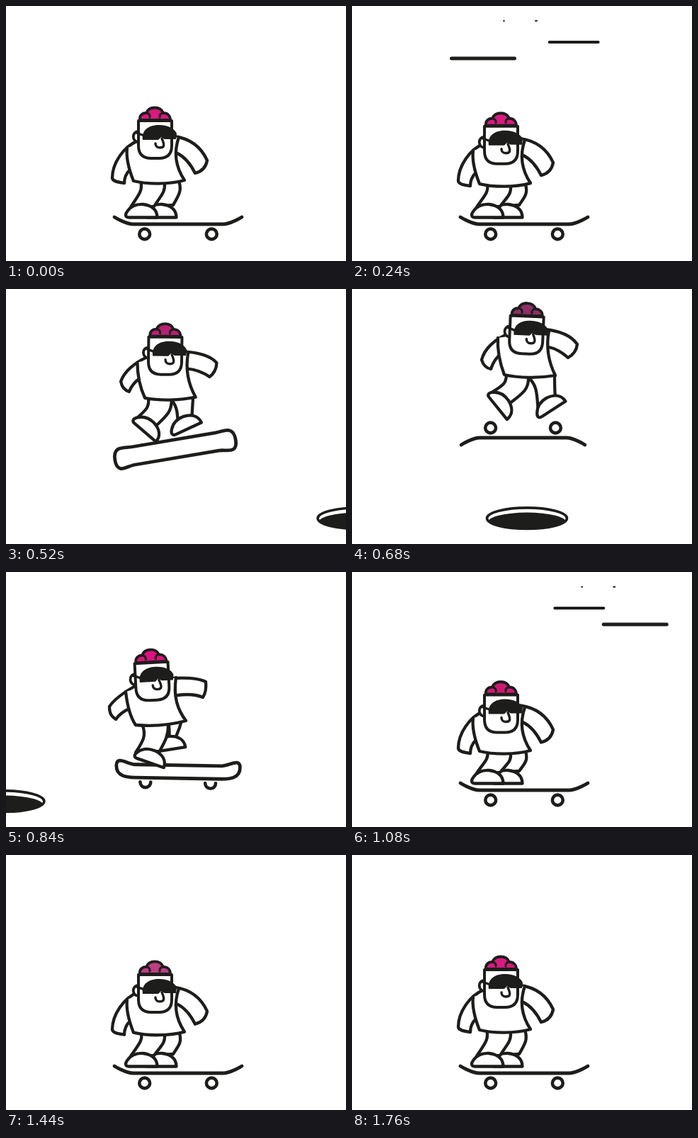
Write an HTML page with a canvas that moves like this. It is 480x360 px and loops after 1970 ms.

```html
<!DOCTYPE html>
<html lang="en">
<head>
<meta charset="utf-8">
<title>Skater</title>
<style>
  html, body { margin: 0; width: 100%; height: 100%; overflow: hidden; background: #fff; }
  canvas { display: block; }
</style>
</head>
<body>
<canvas id="stage" width="480" height="360"></canvas>
<script>
const ctx = document.getElementById('stage').getContext('2d');
const LOOP = 1970, TICK = 40, INK = '#1d1d1b', LINE = 4.3;
const NUM = /-?\d+(\.\d+)?/g;
const nums = s => s.match(NUM).map(Number);
const rad = deg => deg * Math.PI / 180;
const lerp = (a, b, k) => a + (b - a) * k;

// Blend two strings of the same structure, number by number.
function mix(a, b, k) {
  const to = nums(b);
  let i = 0;
  return a.replace(NUM, n => lerp(+n, to[i++], k).toFixed(2));
}
function shift(s, dx, dy) {
  let i = 0;
  return s.replace(NUM, n => +n + (i++ % 2 ? dy : dx));
}

// head, near, far: x y angle; board: x y tilt length
const stand = {
  head: '0 0 0',
  armL: 'M187 190 C166 198 150 222 150 243 C151 248 160 249 167 250 C167 241 170 236 175 231',
  armR: 'M238 184 C258 187 275 198 284 218 C282 229 275 234 267 236 C261 224 254 214 242 208',
  torso: 'M171 200 C169 216 174 232 180 247 C200 252 230 252 252 246 C240 228 236 208 244 185',
  legN: 'M190 247 C194 261 186 268 176 284 L209 283 C218 268 225 264 224 250',
  legF: 'M222 250 C225 264 216 270 209 283 L236 281 C243 268 249 262 244 247',
  near: '191.5 298.5 0',
  far: '218.5 298.5 0',
  board: '243 308 0 1'
};
const squat = {
  ...stand,
  head: '0 11.5 0',
  armL: shift(stand.armL, 0, 6),
  armR: shift(stand.armR, 0, 4.5),
  torso: shift(stand.torso, 0, 6),
  legN: 'M191 253 C194 264 185 270 176 284 L209 283 C219 270 225 268 224 256',
  legF: 'M222 256 C225 268 217 272 209 283 L236 281 C244 270 249 266 245 253'
};
const pop = {
  head: '-30 -34 -3',
  armL: 'M157 163 C141 172 126 182 119 193 C119 203 122 207 128 211 C132 205 138 200 147 196',
  armR: 'M207 153 C225 152 244 152 255 158 C256 167 254 175 251 180 C242 176 230 175 215 177',
  torso: 'M143 175 C145 193 149 210 157 222 C180 224 206 222 228 216 C216 200 210 182 214 155',
  legN: 'M166 222 C171 236 167 243 156 260 L190 258 C196 246 202 238 202 222',
  legF: 'M202 222 C203 232 203 234 202 240 L212 237 C215 230 217 226 219 218',
  near: '174.5 272 19',
  far: '200 254 -8',
  board: '233 257.5 -29.5 0.95'
};
const apex = {
  head: '35.5 -123.5 2.5',
  armL: 'M219 64 C202 71 187 84 183 100 C185 107 190 112 196 113 C199 104 203 97 210 92',
  armR: 'M272 57 C292 59 309 65 318 78 C317 87 312 93 305 97 C296 89 288 84 274 81',
  torso: 'M206 69 C205 86 209 105 215 121 C236 126 264 126 287 122 C277 102 274 80 278 59',
  legN: 'M218 120 C218 135 212 136 196 147 L222 162 C240 148 250 142 249 125',
  legF: 'M249 125 C262 136 261 150 263 174 L287 153 C286 143 286 135 286 120',
  near: '205 167 51',
  far: '283 170.5 -33',
  board: '241.5 210 0 0.97'
};
const drop = {
  head: '-4 -34 -3',
  armL: shift(pop.armL, 27, -3),
  armR: shift(pop.armR, 27, -3),
  torso: shift(pop.torso, 26, -6),
  legN: shift(pop.legN, 27, -5),
  legF: shift(pop.legF, 28, -5),
  near: '202 269 19',
  far: '231.5 250.5 -9',
  board: '243 282 1 0.97'
};
const crouch = k => {
  const p = {};
  for (const part in stand) p[part] = mix(stand[part], squat[part], k);
  return p;
};

const linear = k => k;
const easeIn = k => k * k;
const easeOut = k => k * (2 - k);
const smooth = k => k * k * (3 - 2 * k);

// time, pose, ease towards it, board roll, helmet colour
const KEYS = [
  [0, stand, linear, 0, '217 26 128'],
  [180, squat, smooth, 0, '217 26 128'],
  [280, crouch(0.5), smooth, 0, '217 26 128'],
  [400, pop, easeIn, 40, '214 22 122'],
  [680, apex, easeOut, 180, '140 48 104'],
  [840, drop, easeIn, 315, '221 18 127'],
  [920, stand, linear, 360, '215 22 124'],
  [1080, squat, easeOut, 360, '204 26 114'],
  [1160, crouch(1.12), easeOut, 360, '204 30 118'],
  [1440, crouch(0.6), smooth, 360, '190 62 132'],
  [1520, crouch(0.38), linear, 360, '200 46 130'],
  [1680, crouch(0.15), linear, 360, '212 30 128'],
  [1760, stand, linear, 360, '217 26 128'],
  [LOOP, stand, linear, 360, '217 26 128']
];
const HOLDS = [1760, 1680, 1520, 1440];

function stroke(path, fill, width = LINE) {
  const p = new Path2D(path);
  if (fill) { ctx.fillStyle = fill; ctx.fill(p); }
  ctx.lineWidth = width;
  ctx.stroke(p);
}
function placed(spec, draw) {
  const [x, y, angle] = nums(spec);
  ctx.save();
  ctx.translate(x, y);
  ctx.rotate(rad(angle));
  draw();
  ctx.restore();
}

function drawHead(spec, colour) {
  const [x, y, angle] = nums(spec);
  placed(`${x + 210} ${y + 190} ${angle}`, () => {
    ctx.translate(-210, -190);
    stroke('M188 177C177 176 177 193 188 192', '#fff', 3.8);
    stroke('M189 161C188 155 192 151 198 151C202 141 218 141 222 151C228 151 232 155 232 161Z', colour, 3.8);
    stroke('M198 151C201 151 204 154 203 157M222 151C219 151 216 154 217 157', null, 3.2);
    stroke('M187 162H234V197Q234 215 216 215H205Q187 215 187 197Z', '#fff', 4);
    stroke('M184 179L195 183', null, 3.4);
    ctx.fillStyle = INK;
    ctx.fill(new Path2D('M193 189C191 174 203 168 216 168C229 168 238 173 241 180L240 188L224 188L219 185L215 189Z'));
    stroke('M220 187C224 196 224 200 217 200C213 200 211 197 211 194', null, 3.4);
  });
}

function drawBoard(spec, roll) {
  const c = Math.cos(rad(roll)), s = Math.sin(rad(roll));
  const h = 13 * Math.abs(s), k = -10 * c, wheelY = c * (14 + 16 * s * s);
  const mid = c > 0 ? Math.PI / 2 : -Math.PI / 2;
  const span = Math.abs(s) < 0.3 ? Math.PI : 1.6;
  const length = nums(spec)[3];
  const tip = 90 * length, bend = 74 * length, flat = 63 * length;
  placed(spec, () => {
    ctx.lineWidth = 4.6;
    for (const side of [-1, 1]) {
      ctx.beginPath();
      ctx.arc(side * 47.3 * length, wheelY, 7.4, mid - span, mid + span);
      ctx.stroke();
    }
    const up = k - 1.65 * h, down = k + 1.65 * h;
    stroke(`M${-tip} ${k}C${-tip} ${up} ${-bend} ${-h} ${-flat} ${-h}` +
      `L${flat} ${-h}C${bend} ${-h} ${tip} ${up} ${tip} ${k}` +
      `C${tip} ${down} ${bend} ${h} ${flat} ${h}` +
      `L${-flat} ${h}C${-bend} ${h} ${-tip} ${down} ${-tip} ${k}Z`, '#fff', 4.8);
  });
}

function drawHole(t) {
  const x = 247 - 1.56 * (t - 680);
  if (x < -60 || x > 540) return;
  const oval = y => {
    ctx.beginPath();
    ctx.ellipse(x, y, 56.5, 14.8, 0, 0, 2 * Math.PI);
  };
  ctx.save();
  oval(323.7);
  ctx.clip();
  ctx.fillStyle = INK;
  oval(330.3);
  ctx.fill();
  ctx.restore();
  oval(323.7);
  ctx.lineWidth = 3.6;
  ctx.stroke();
}

// y, width, length, left end, start times
const STREAKS = [
  [51, 4, 73, 37, [133, 977]],
  [74, 5, 94, 0, [60, 1013]]
];
const streakX = (t, start) => 480 - 1.9 * (t - start);

function drawStreaks(t) {
  for (const [y, width, length, end, starts] of STREAKS) {
    for (const start of starts) {
      const x = streakX(t, start), tail = x + length;
      if (x > 480 || tail <= end) continue;
      const a = Math.max(x, end) + width / 2;
      stroke(`M${a} ${y}L${Math.max(a, tail - width / 2)} ${y}`, null, width);
    }
  }
  // the faintest streak shows only its two ends
  for (const start of [100, 998]) {
    const x = streakX(t, start);
    stroke(`M${x} 21h1M${x + 45} 21h2`, null, 1.8);
  }
}

function drawDust(t) {
  if (t < 320 || t > 440) return;
  const size = (460 - t) / 15;
  [[136, 338], [145, 342], [152, 341], [159, 337]].forEach(([x, y], i) => {
    const lean = (1.5 - i) * 0.3;
    stroke(`M${x} ${y}l${lean * size} ${size * 0.7}`, null, 1.2);
  });
}

function render(t) {
  let i = KEYS.findIndex(key => key[0] > t);
  if (i < 0) i = KEYS.length - 1;
  const [t0, from, , roll0, colour0] = KEYS[i - 1];
  const [t1, to, ease, roll1, colour1] = KEYS[i];
  const raw = (t - t0) / (t1 - t0), k = ease(raw);
  const at = part => mix(from[part], to[part], k);
  const shoe = part => placed(at(part), () =>
    stroke('M-18 0C-23 0 -24 -4 -20 -9C-15 -16 -8 -19 2 -18.5C14 -17 22 -11 22 0Z', '#fff'));

  ctx.fillStyle = '#fff';
  ctx.fillRect(0, 0, 480, 360);
  ctx.strokeStyle = INK;
  ctx.lineCap = ctx.lineJoin = 'round';

  drawStreaks(t);
  drawHole(t);
  drawDust(t);
  drawBoard(at('board'), lerp(roll0, roll1, raw));
  stroke(at('legF'), '#fff');
  shoe('far');
  stroke(at('legN'), '#fff');
  shoe('near');
  for (const part of ['armL', 'armR', 'torso']) stroke(at(part), '#fff');
  drawHead(at('head'), `rgb(${mix(colour0, colour1, raw)})`);
}

const begin = performance.now();
function frame() {
  const t = (performance.now() - begin) % LOOP;
  const hold = HOLDS.find(h => t >= h);
  render(hold || Math.floor(t / TICK) * TICK);
  requestAnimationFrame(frame);
}
frame();
</script>
</body>
</html>
```
